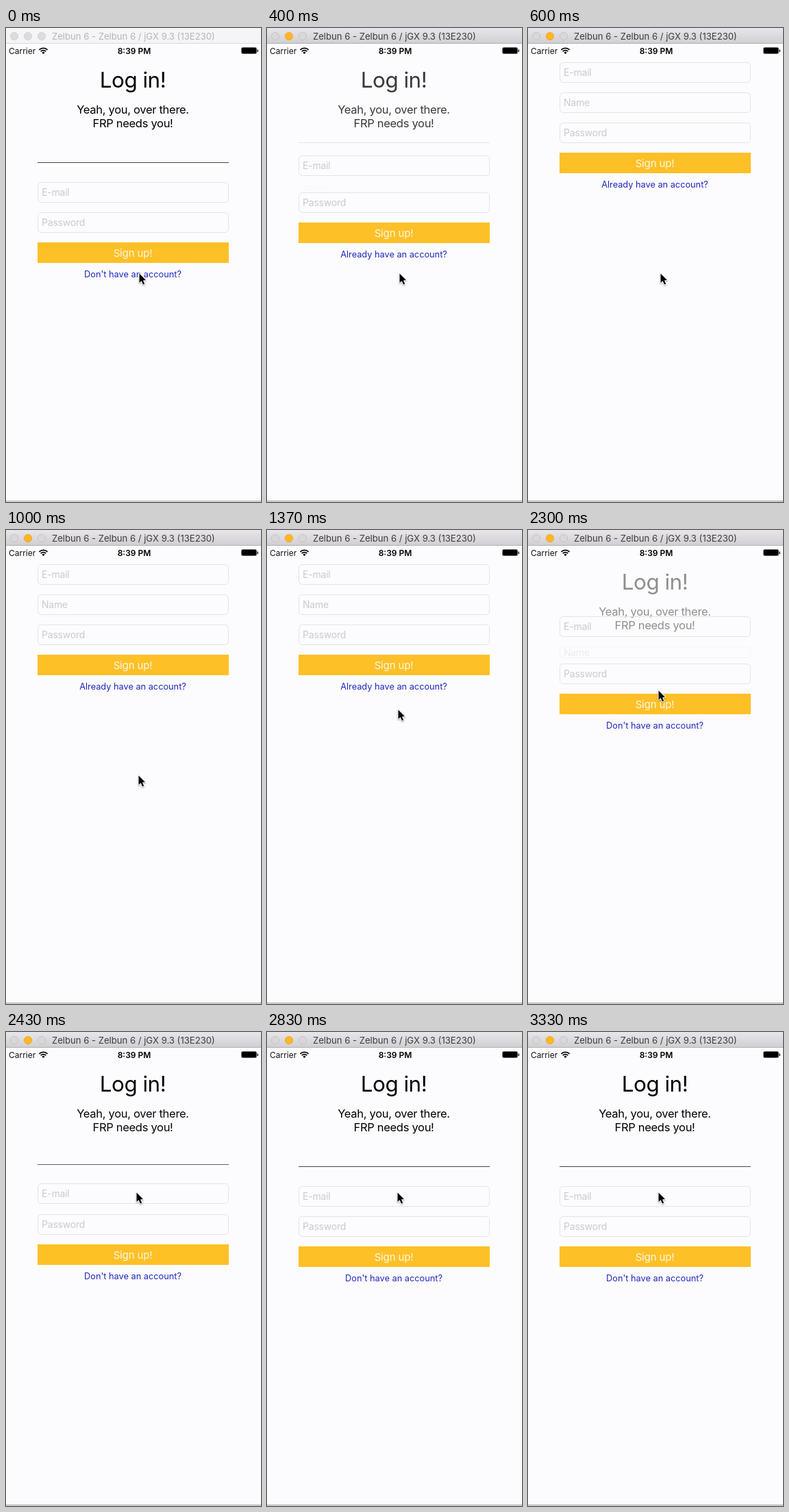
An HTML page with a canvas for the animation above (3.36 s loop, 372 by 692 pixels).

```html
<!DOCTYPE html>
<html lang="en">
<head>
<meta charset="utf-8">
<title>Login form transition</title>
<style>
  html, body { margin: 0; width: 100%; height: 100%; overflow: hidden; background: #fcfcfe; }
  canvas { display: block; width: 372px; height: 692px; }
</style>
</head>
<body>
<canvas id="stage" width="372" height="692"></canvas>
<script>
const ctx = document.getElementById('stage').getContext('2d');
const WIDTH = 372, HEIGHT = 692, LOOP = 3360;
const LEFT = 46, FORM_WIDTH = 279, MIDDLE = 185;
const FOCUS_AT = 130, OPEN_AT = 314, CLOSE_AT = 2171, SLIDE = 285;
const MOVE_START = 1110, MOVE_END = 1487;
const PAPER = '#fcfcfe';

const lerp = (a, b, k) => a + (b - a) * k;

function ease(t, start, end) {
  const k = Math.min(1, Math.max(0, (t - start) / (end - start)));
  return k * k * (3 - 2 * k);
}

function text(str, x, y, size, color, { align = 'left', weight = 400, spacing = 0 } = {}) {
  ctx.font = `${weight} ${size}px Inter, "Open Sans", sans-serif`;
  ctx.letterSpacing = spacing + 'px';
  ctx.textAlign = align;
  ctx.fillStyle = color;
  ctx.fillText(str, x, y);
}

function rect(x, y, w, h, color) {
  ctx.fillStyle = color;
  ctx.fillRect(x, y, w, h);
}

function roundRect(x, y, w, h, r) {
  ctx.beginPath();
  ctx.roundRect(x, y, w, h, r);
}

function titleBar(active) {
  const shade = ctx.createLinearGradient(0, 0, 0, 22);
  shade.addColorStop(0, active ? '#e8e6ea' : '#f6f5f7');
  shade.addColorStop(1, active ? '#d1cfd3' : '#f4f3f5');
  rect(0, 0, WIDTH, 22, shade);
  rect(0, 22, WIDTH, 1, active ? '#b2b0b3' : '#dad9db');

  [12, 32, 52].forEach((x, i) => {
    const lit = active && i === 1;
    ctx.beginPath();
    ctx.arc(x, 12, 5.6, 0, Math.PI * 2);
    ctx.fillStyle = lit ? '#ffb524' : active ? '#d9d7da' : '#dcdbdd';
    ctx.fill();
    ctx.lineWidth = 0.8;
    ctx.strokeStyle = lit ? '#eba41c' : active ? '#bfbdc0' : '#d0cfd1';
    ctx.stroke();
  });
  text('Zelbun 6 - Zelbun 6 / jGX 9.3 (13E230)', 67, 17, 13.1, active ? '#3c3b3d' : '#b5b4b6');
}

function statusBar() {
  text('Carrier', 4, 38, 12, '#111');
  text('8:39 PM', 187, 38, 12, '#000', { align: 'center', weight: 600 });

  ctx.strokeStyle = '#000';
  ctx.lineWidth = 1.7;
  for (const r of [8.6, 5.4]) {
    ctx.beginPath();
    ctx.arc(54.5, 38, r, -Math.PI * 0.75, -Math.PI * 0.25);
    ctx.stroke();
  }
  ctx.fillStyle = '#000';
  ctx.beginPath();
  ctx.moveTo(54.5, 38);
  ctx.arc(54.5, 38, 3, -Math.PI * 0.75, -Math.PI * 0.25);
  ctx.fill();

  roundRect(343.5, 28.5, 22, 9, 2);
  ctx.lineWidth = 1;
  ctx.strokeStyle = '#666';
  ctx.stroke();
  rect(344, 29, 21, 8, '#000');
  rect(366.5, 31.5, 1.3, 3.5, '#000');
}

function header(p) {
  if (p >= 1) return;
  ctx.globalAlpha = 1 - p;
  text('Log in!', MIDDLE, 87, 31.4, '#000', { align: 'center', spacing: -0.5 });
  const line = { align: 'center', spacing: -0.3 };
  text('Yeah, you, over there.', MIDDLE, 124.5, 16.5, '#000', line);
  text('FRP needs you!', MIDDLE, 144.5, 16.5, '#000', line);
  ctx.globalAlpha = (1 - p) ** 8;
  rect(LEFT, Math.round(196 - 131 * p), FORM_WIDTH, 1, '#444');
  ctx.globalAlpha = 1;
}

function field(label, y, height = 30) {
  roundRect(LEFT + 0.5, y + 0.5, FORM_WIDTH - 1, Math.max(0, height - 1), Math.min(5, height / 2));
  ctx.lineWidth = 1;
  ctx.strokeStyle = '#e3e3e4';
  ctx.stroke();
  ctx.save();
  ctx.clip();
  text(label, 52, y + height / 2 + 5, 14, '#cacacd', { spacing: -0.2 });
  ctx.restore();
}

// p: 0 is the login form, 1 is the sign-up form with the extra field.
function form(p, signingUp) {
  const top = Math.round(lerp(225, 50, p));
  const lower = Math.round(lerp(269, 138, p));
  const button = lower + 44;

  field('E-mail', top);
  if (p > 0) {
    ctx.globalAlpha = p * p;
    field('Name', top + 44, Math.round(30 * p));
    ctx.globalAlpha = 1;
  }
  field('Password', lower);

  rect(LEFT, button, FORM_WIDTH, 30, '#fec027');
  text('Sign up!', MIDDLE, button + 21, 15, '#fff8e6', { align: 'center', spacing: -0.15 });
  const question = signingUp ? 'Already have an account?' : "Don't have an account?";
  text(question, MIDDLE, button + 51, 12.75, '#2026c0', { align: 'center' });
}

function cursor(x, y) {
  ctx.save();
  ctx.translate(x, y);
  ctx.beginPath();
  [[0.5, 0.5], [0.5, 14], [3.6, 11.2], [6, 16.6], [8.2, 15.6], [5.9, 10.4], [10, 10]]
    .forEach(([px, py]) => ctx.lineTo(px, py));
  ctx.closePath();
  ctx.shadowColor = 'rgba(0, 0, 0, 0.35)';
  ctx.shadowBlur = 2;
  ctx.shadowOffsetY = 1;
  ctx.lineJoin = 'round';
  ctx.lineWidth = 2;
  ctx.strokeStyle = '#fff';
  ctx.stroke();
  ctx.shadowColor = 'transparent';
  ctx.fillStyle = '#000';
  ctx.fill();
  ctx.restore();
}

function draw(t) {
  const active = t >= FOCUS_AT;
  const signingUp = t >= OPEN_AT && t < CLOSE_AT;
  const p = ease(t, OPEN_AT, OPEN_AT + SLIDE) - ease(t, CLOSE_AT, CLOSE_AT + SLIDE);
  const move = ease(t, MOVE_START, MOVE_END);

  rect(0, 0, WIDTH, HEIGHT, PAPER);
  header(p);
  form(p, signingUp);
  titleBar(active);
  statusBar();
  rect(0, 690, WIDTH, 1, active ? '#a3a2a4' : '#b4b3b5');
  rect(0, 691, WIDTH, 1, '#e4e3e5');
  cursor(Math.round(lerp(active ? 193 : 194, 190, move)), Math.round(lerp(358, 234, move)));
}

const began = performance.now();
function tick() {
  draw((performance.now() - began) % LOOP);
  requestAnimationFrame(tick);
}
tick();
</script>
</body>
</html>
```
